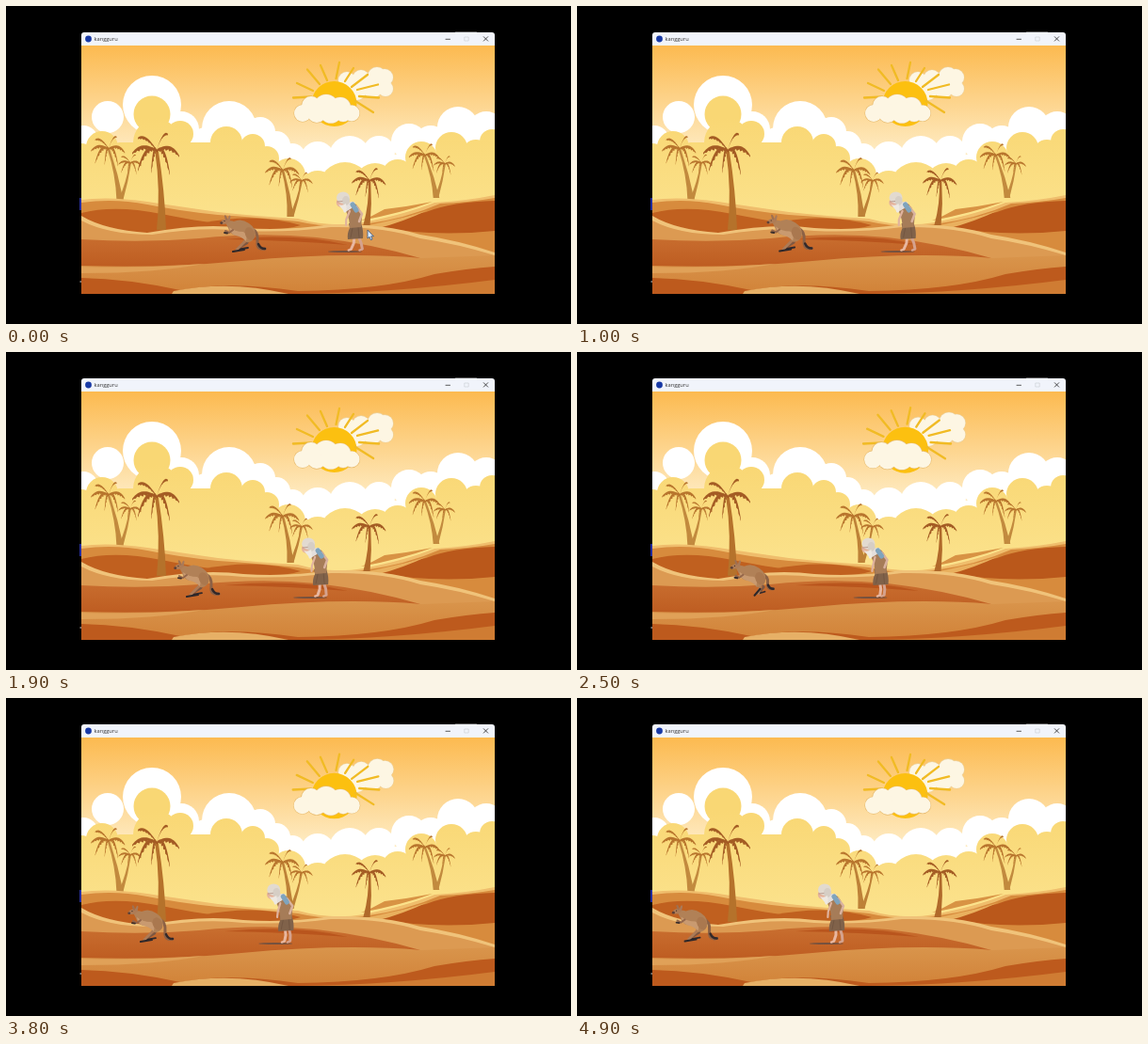
An HTML page with a canvas that plays this animation: 600 px wide and 338 px high, repeating every 5 s.

```html
<!DOCTYPE html>
<html lang="en">
<head>
<meta charset="utf-8">
<title>kangguru</title>
<style>
html, body { margin: 0; width: 100%; height: 100%; overflow: hidden; background: #000; }
canvas { display: block; width: 600px; height: 338px; }
</style>
</head>
<body>
<canvas id="stage" width="600" height="338"></canvas>
<script>
const stage = document.getElementById('stage');
let c = stage.getContext('2d');
const LOOP = 5000, STEP = 100, CYCLE = 1000;

const fill = (d, color) => { c.fillStyle = color; c.fill(new Path2D(d)); };
const line = (d, color, w) => {
  c.strokeStyle = color;
  c.lineWidth = w;
  c.lineCap = c.lineJoin = 'round';
  c.stroke(new Path2D(d));
};
const oval = (x, y, rx, ry, color, turn = 0) => {
  c.fillStyle = color;
  c.beginPath();
  c.ellipse(x, y, rx, ry, turn, 0, 7);
  c.fill();
};
const puffs = (list, color) => list.forEach(([x, y, r]) => oval(x, y, r, r, color));
const fade = (y0, y1, a, b) => {
  const g = c.createLinearGradient(0, y0, 0, y1);
  g.addColorStop(0, a);
  g.addColorStop(1, b);
  return g;
};

// One drooping, notched frond from the crown to its tip
function frond(tx, ty, color) {
  const cx = tx * .62, cy = Math.min(ty, 0) * .7 - 11, n = 14, top = [], low = [];
  for (let i = 0; i <= n; i++) {
    const u = i / n, v = 1 - u;
    const x = 2 * u * v * cx + u * u * tx, y = 2 * u * v * cy + u * u * ty;
    const w = Math.sin(Math.PI * Math.min(1, u * .85 + .1)) * (i % 2 ? 2.3 : 4.2);
    top.push(`${x} ${y - 1}`);
    low.unshift(`${x - Math.sign(tx) * w * .45} ${y + w}`);
  }
  fill('M' + top.concat(low).join('L') + 'Z', color);
}

function palm(x, y, rootX, rootY, s, leaf, trunk) {
  const w = 3.6 * s, b = 5 * s;
  fill(`M${x - w / 2} ${y}Q${(x + rootX) / 2 + 2 * s} ${(y + rootY) / 2} ${rootX - b} ${rootY}
    H${rootX + b}Q${(x + rootX) / 2 + 6 * s} ${(y + rootY) / 2} ${x + w / 2} ${y}Z`, trunk);
  c.save();
  c.translate(x, y);
  c.scale(s, s);
  [[-26, 3], [-20, 21], [-20, -13], [-6, 23], [14, 25], [24, 6], [12, -17]]
    .forEach(([a, b]) => frond(a, b, leaf));
  c.restore();
}

function scenery() {
  c.fillStyle = fade(42, 150, '#fcba50', '#fee9bd');
  c.fillRect(80, 42, 439, 264);
  puffs([[82, 143, 16], [108, 118, 17], [155, 105, 31], [186, 131, 19], [212, 145, 16],
    [237, 130, 29], [270, 134, 16], [287, 148, 15], [304, 160, 14], [331, 162, 18],
    [365, 160, 22], [396, 155, 17], [428, 144, 19], [451, 144, 17], [480, 129, 22], [510, 131, 19]], '#fff');
  c.fillStyle = '#fff';
  c.fillRect(80, 158, 439, 40);
  const haze = fade(120, 225, '#f9d774', '#fbe28c');
  puffs([[80, 160, 14], [102, 150, 17], [155, 115, 19.5], [160, 145, 25], [185, 136, 14], [208, 162, 16],
    [234, 145, 17], [262, 149, 13], [277, 162, 13], [300, 180, 18], [331, 193, 18],
    [360, 194, 28], [392, 189, 22], [416, 180, 17], [441, 161, 17], [473, 151, 17],
    [499, 157, 15], [516, 144, 13]], haze);
  fill('M80 158L120 145H260L302 178H405L440 157L519 150V240H80Z', haze);

  palm(109, 152, 121, 206, .72, '#b8752d', '#c28a3e');
  palm(132, 167, 122, 206, .48, '#b8752d', '#c28a3e');
  palm(294, 175, 302, 224, .72, '#b8752d', '#bd8137');
  palm(314, 186, 303, 224, .48, '#b8752d', '#bd8137');
  palm(445, 159, 457, 204, .66, '#b8752d', '#c28a3e');
  palm(466, 168, 457, 204, .45, '#b8752d', '#c28a3e');

  // Far dunes
  fill('M80 206Q110 202 150 208T225 219Q270 224 310 226Q345 236 380 230Q425 221 455 209Q490 207 519 201V306H80Z', '#efbd6c');
  fill('M80 209Q115 204 150 211T225 222Q270 225 310 229Q345 237 380 232Q425 226 461 210Q490 209 519 204V306H80Z', '#d78b3d');
  fill('M80 220Q115 211 165 221T245 233L150 246H80Z', '#c0601f');
  fill('M207 231Q265 219 313 233Q295 239 260 238Z', '#c0601f');
  fill('M519 207Q473 208 446 219Q420 224 393 234Q450 246 519 239Z', '#ba581b');
  fill('M377 228Q420 220 453 208Q428 213 402 216Q390 223 377 228Z', '#d89344');
  fill('M380 234Q425 225 448 217Q420 230 396 236Z', '#e9b05e');

  // Middle dunes
  fill('M80 223Q105 238 150 241Q210 230 252 236Q300 239 345 232Q400 231 440 243Q480 249 519 262V306H80Z', '#f0c37a');
  fill('M80 228Q108 243 155 243Q210 234 252 239Q300 241 345 235Q400 234 440 247Q480 253 519 265V306H80Z', '#dc9a52');
  fill('M80 248Q145 252 205 247Q270 240 330 246Q390 253 440 268Q340 264 245 274Q150 281 80 277Z', fade(243, 280, '#c96f30', '#bd5b20'));
  fill('M232 248Q310 241 363 254Q300 249 232 248Z', '#b9551d');

  // Near dunes
  fill('M80 276Q165 279 250 271Q360 261 440 268L519 265V306H80Z', fade(264, 306, '#d9954c', '#d18238'));
  fill('M80 277Q150 279 210 274Q160 284 80 284Z', '#e0a158');
  fill('M80 289Q130 290 185 302Q235 292 310 303Q400 302 455 285Q490 279 519 277V306H80Z', '#bd5a1d');
  fill('M178 303Q237 291 300 306H176Z', '#e6b066');
  fill('M310 306Q410 305 519 291V306Z', '#cf7c33');

  palm(160, 154, 165, 238, 1, '#a45c24', '#b5722b');
  palm(386, 186, 383, 233, .72, '#a45c24', '#b0692a');

  // Window frame
  fill('M80 42V31Q80 28 83 28H516Q519 28 519 31V42Z', '#f1f4fb');
  oval(87.5, 35, 3.4, 3.4, '#1839a5');
  c.fillStyle = '#333';
  c.font = '5.7px "Open Sans", "Noto Sans", sans-serif';
  c.fillText('kangguru', 93.5, 37);
  line('M467 35.3H471.5', '#333', .8);
  line('M487.2 33H491.2V37H487.2Z', '#c8cbd1', .6);
  line('M507.3 32.7L511.7 37.1M511.7 32.7L507.3 37.1', '#222', .8);
  fill('M477 27H500V28H477Z', '#555');
  fill('M78 204H80V217H78Z', '#202a9c');
  fill('M78.5 292H80V294H78.5Z', '#777');
}

function sun(t) {
  const s = 1 + .011 * (1 - Math.cos(2 * Math.PI * t / CYCLE));
  c.save();
  c.translate(348, 97);
  c.scale(s, s);
  c.translate(-348, -97);
  const cloud = (list, edge) => {
    puffs(list.map(([x, y, r]) => [x, y, r + .6]), edge);
    puffs(list, '#fdf6e3');
  };
  cloud([[362, 79, 9], [377, 77, 9], [394, 75, 10], [402, 76, 9], [403, 88, 8], [389, 88, 10], [372, 89, 11]], '#ecd09a');
  oval(348.5, 104, 24, 24, '#fcc010');
  line('M305 97.5L324 96.5M309 82L326 90M320 67.5L333 83M334 63L341 79M354 60L350.5 77' +
    'M369 66L360 80M384 73L367 86M395 83.5L373 89M396 97.5L375 96M390 113L371 101', '#f1bb24', 2.3);
  cloud([[315, 114, 9], [324, 106, 10], [340, 107, 13], [355, 108, 11], [367, 114, 8.5], [330, 114, 10], [345, 113, 11.5], [358, 115, 8]], '#e8bd72');
  c.restore();
}

// Keyed value over one cycle, eased between neighbours
function keyed(t, keys) {
  const p = t % CYCLE, i = keys.findIndex(k => k[0] > p);
  const [t0, a] = keys[i - 1], [t1, b] = keys[i];
  const u = (p - t0) / (t1 - t0);
  return a + (b - a) * u * u * (3 - 2 * u);
}

function kangaroo(t) {
  const leap = keyed(t, [[0, 0], [200, .45], [400, 1], [500, 1], [600, 0], [1001, 0]]);
  const lift = keyed(t, [[0, 0], [200, 4], [400, 0], [1001, 0]]);
  const mix = (a, b) => a + (b - a) * leap;
  c.save();
  c.translate(250 - .0258 * t, 240 - .0005 * t - lift);
  const fx = mix(-9, 3), fy = mix(21, 20), hx = mix(4, 11), hy = mix(12, 11);
  const tx = mix(25, 23), ty = mix(18, 13);
  line(`M11 -3Q18 0 ${mix(17, 17)} ${mix(10, 7)}T${tx} ${ty}`, '#8c6145', 3);
  line(`M${mix(18, 17.5)} ${mix(13, 9)}Q${mix(20, 19)} ${mix(18, 13)} ${tx} ${ty}`, '#33292a', 2.5);
  line(`M8 6L${hx + 2} ${hy}L${fx + 5} ${fy - 3}`, '#7d5742', 2.4);
  line(`M${fx + 4} ${fy - 2}L${hx + 3} ${hy + 5}`, '#30282b', 1.8);
  line(`M7 6L${hx - 2} ${hy}L${fx + 4} ${fy - 2}`, '#ad7a55', 2.8);
  line(`M${fx} ${fy}L${fx + mix(12, 6)} ${fy - mix(2, 7)}`, '#2c272a', 2);
  fill('M-17 -10Q-12 -13 -8 -11Q0 -15 8 -9Q17 -3 14 6Q11 12 5 11Q1 4 -5 4Q-12 3 -14 -4Z', '#b18157');
  fill('M-13 -5Q-7 0 2 0Q7 2 5 10Q0 5 -6 4Q-12 2 -13 -5Z', '#c99a70');
  oval(9, 2, 5, 7, '#aa784f', -.4);
  line('M-9 -2L-13 1L-17 -1', '#94664a', 2);
  line('M-15 1.5L-18 1', '#3a2d2b', 1.8);
  oval(-17, -11, 5.2, 2.7, '#ae7c56', -.3);
  oval(-21.2, -9.4, 1.5, 1.3, '#5c4037');
  oval(-16.5, -15, 1.2, 3, '#9f7050', -.4);
  oval(-13, -14.5, 1.2, 3, '#a97a59', .3);
  oval(-18, -11.5, .6, .6, '#2c2020');
  c.restore();
}

function walker(t) {
  const spread = .5 + .5 * Math.cos(2 * Math.PI * (t - 120) / CYCLE);
  const dip = keyed(t, [[0, 0], [200, 3.5], [400, 0], [1001, 0]]);
  c.save();
  c.translate(357 - .0194 * t, 0);
  oval(3, 261, 18, 1.1, '#74513f');
  const front = 14 - 5 * spread, back = 17 + 5 * spread;
  const leg = (x0, x, color) => {
    line(`M${x0} 244L${(x0 + x) / 2 + 1} 252L${x} 258`, color, 3);
    line(`M${x} 258.5L${x - 3} 259.6`, color, 2.2);
  };
  leg(17, back, '#d5a28d');
  leg(13, front, '#e8b7a0');
  fill('M7 231L20 231Q23 239 22 247L6 248Q5 242 8 236Z', '#80624a');
  line('M11 236L9 246M17 235L18 246', '#70533f', .8);
  c.translate(0, dip);
  fill('M3 211Q9 206 15 211Q20 216 21 225L20 235L8 236Q8 226 4 218Z', '#a67c58');
  fill('M2 212Q8 206 14 209L10 215L5 218Z', '#e4dfdc');
  line('M15 213L21 221L18 229', '#d9b29f', 2.5);
  line('M11 211L15 217', '#7fa4bd', 5);
  line(`M8 218L${6 - spread * 2} 227L${5 - spread} 233`, '#e0b39e', 2.2);
  oval(-1, 209, 5.2, 5, '#e5b39c');
  oval(1, 203.7, 7, 6.2, '#e2dad0');
  oval(4, 207, 4, 5, '#d6cec5');
  fill('M-4 211Q0 213 4 210L5 218Q2 222 1 217Z', '#eee9e2');
  line('M-5 208L0 207.5', '#a98577', .7);
  c.restore();
}

function pointer() {
  const d = 'M384 238.5V247L386 245.3L387.4 248.6L389 248L387.6 244.8H390Z';
  fill(d, '#dcecff');
  line(d, '#315a8c', .8);
}

const back = document.createElement('canvas');
back.width = 600;
back.height = 338;
const front = c;
c = back.getContext('2d');
c.save();
c.fillRect(0, 0, 600, 338);
c.beginPath();
c.rect(78, 26, 441, 280);
c.clip();
scenery();
c.restore();
// Trim scenery that spills past the window's left edge
c.fillStyle = '#000';
c.fillRect(0, 42, 80, 264);
fill('M78 204H80V217H78Z', '#202a9c');
fill('M78.5 292H80V294H78.5Z', '#777');
c = front;

const start = performance.now();
function draw(now) {
  const t = Math.floor((Math.max(0, now - start) % LOOP) / STEP) * STEP;
  c.drawImage(back, 0, 0);
  sun(t);
  kangaroo(t);
  walker(t);
  if (t < 300) pointer();
  requestAnimationFrame(draw);
}
draw(start);
</script>
</body>
</html>
```
